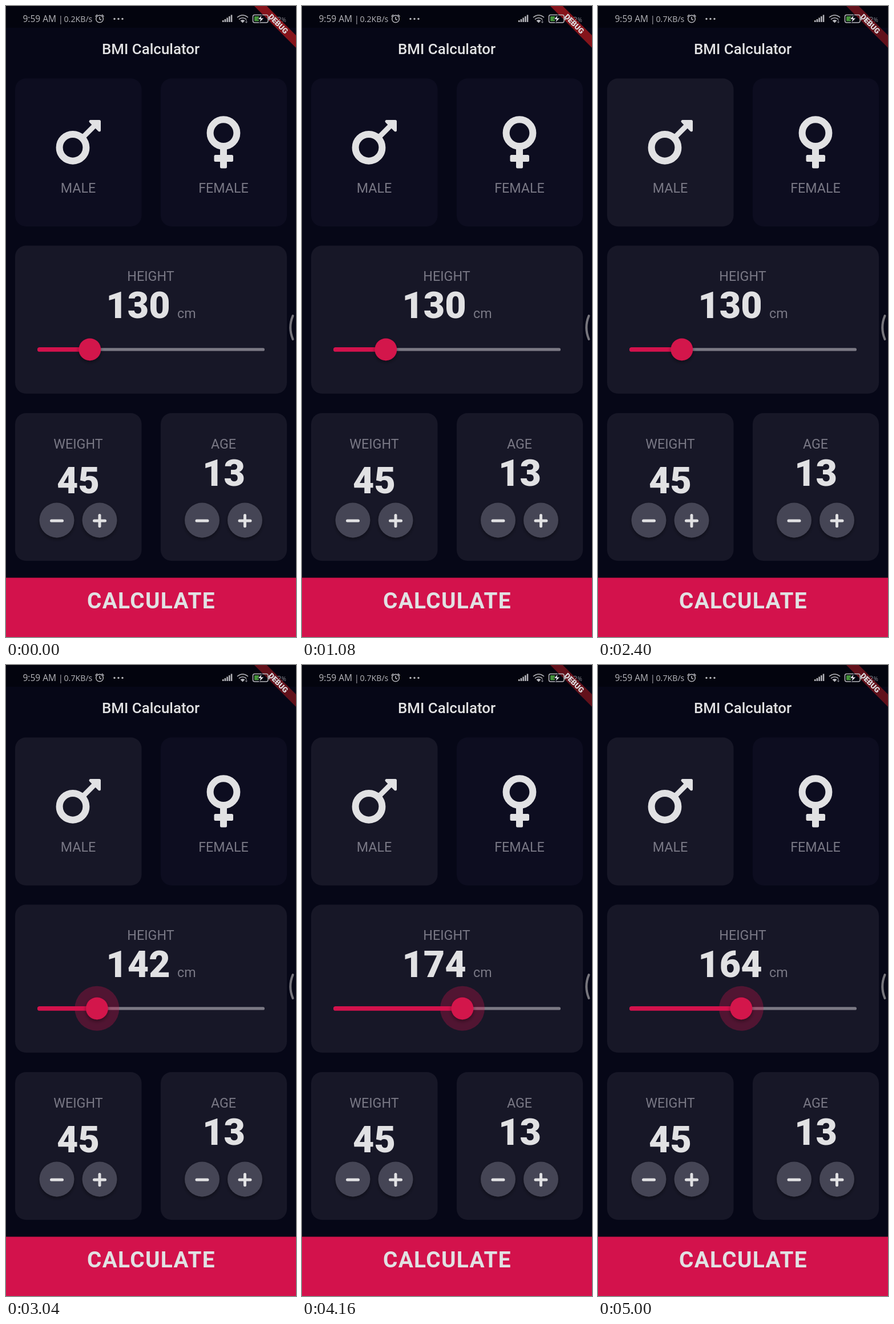
An HTML page for the animation above (5040 ms loop, 508x1102 px).

```html
<!DOCTYPE html>
<html lang="en">
<head>
<meta charset="utf-8">
<title>BMI Calculator</title>
<style>
  html, body { margin: 0; width: 100%; height: 100%; overflow: hidden; background: #060717; }
  svg { display: block; width: 508px; height: 1102px; font-family: Roboto, sans-serif; fill: #e1e1e3; }
  .mid { text-anchor: middle; }
  .label { font-size: 23.3px; fill: #797885; }
  .number { font-size: 64.6px; font-weight: 900; }
  .card { fill: #171727; }
  .idle { fill: #0d0d20; }
  .line { fill: none; stroke: #e1e1e3; }
  .status { font-family: "Open Sans", sans-serif; fill: #b8b8bd; }
  .status .line { stroke: #b8b8bd; stroke-width: 1.5; }
  .pink { fill: #d3124c; }
</style>
</head>
<body>
<svg viewBox="0 0 508 1102">
  <defs>
    <filter id="shadow" x="-30%" y="-30%" width="160%" height="170%">
      <feDropShadow dx="0" dy="3" stdDeviation="3" flood-color="#000" flood-opacity=".4"/>
    </filter>
    <g id="button">
      <circle r="30.4" fill="#454554" filter="url(#shadow)"/>
      <path class="line" d="M-9.5 1H9.5" stroke-width="5" stroke-linecap="round"/>
    </g>
    <g id="plus">
      <use href="#button"/>
      <path class="line" d="M0-8.5V10.5" stroke-width="5" stroke-linecap="round"/>
    </g>
  </defs>

  <rect width="508" height="1102" fill="#060717"/>
  <rect width="508" height="38" fill="#03040e"/>
  <text class="mid" x="253.5" y="83.5" font-size="25.9" font-weight="500">BMI Calculator</text>

  <rect id="maleCard" class="idle" x="16" y="126.5" width="221.5" height="258.5" rx="19"/>
  <rect class="idle" x="271" y="126.5" width="221" height="258.5" rx="19"/>
  <rect class="card" x="16" y="418.5" width="476" height="258.5" rx="19"/>
  <rect class="card" x="16" y="711" width="221.5" height="258" rx="19"/>
  <rect class="card" x="271" y="711" width="221" height="258" rx="19"/>

  <g class="line" stroke-width="12">
    <circle cx="117" cy="247.3" r="23.4"/>
    <path d="M133 231L156 208" stroke-width="9"/>
    <path d="M148 201.500H163.500V217Z" fill="#e1e1e3" stroke-width="5" stroke-linejoin="round"/>
    <circle cx="381" cy="221.700" r="23.4"/>
    <path d="M381 248V262"/>
  </g>
  <rect x="364.500" y="260" width="33.500" height="12" rx="2.500"/>
  <rect x="375" y="254" width="12" height="29.500" rx="2.500"/>
  <text class="label mid" x="126.500" y="326">MALE</text>
  <text class="label mid" x="381" y="326">FEMALE</text>

  <text class="label mid" x="253.500" y="479.500">HEIGHT</text>
  <text class="number mid" id="height" x="231.500" y="544.500">130</text>
  <text class="label" x="300" y="544.800">cm</text>
  <rect x="55" y="597.300" width="398" height="5.200" rx="2.600" fill="#7b7984"/>
  <rect id="filled" class="pink" x="55" y="596" width="92" height="7.800" rx="3.900"/>
  <g id="thumb">
    <circle id="halo" class="pink" r="39" opacity=".31"/>
    <circle class="pink" r="19.400" filter="url(#shadow)"/>
  </g>

  <text class="label mid" x="126.500" y="772.500">WEIGHT</text>
  <text class="number mid" x="126.500" y="851">45</text>
  <text class="label mid" x="381" y="772.500">AGE</text>
  <text class="number mid" x="381.500" y="838">13</text>
  <use href="#button" x="89" y="898"/>
  <use href="#plus" x="164" y="898"/>
  <use href="#button" x="343.500" y="898"/>
  <use href="#plus" x="418.500" y="898"/>

  <rect class="pink" y="998.500" width="508" height="104"/>
  <text class="mid" x="254.500" y="1051.500" font-size="38.800" font-weight="700" letter-spacing="1.300">CALCULATE</text>
  <path d="M502.500 541Q494 561.500 502.500 582" fill="none" stroke="#77767d" stroke-width="4" stroke-linecap="round"/>

  <g transform="translate(508) rotate(45)">
    <rect id="banner" x="-52" y="36.200" width="104" height="15.500" fill="#85141b"/>
    <text class="mid" y="48.600" font-size="13.200" font-weight="900">DEBUG</text>
  </g>

  <g class="status">
    <text x="29.500" y="28" font-size="15.500">9:59 AM</text>
    <text x="92" y="27.500" font-size="14">|</text>
    <text id="speed" x="101.500" y="28" font-size="14.200">0.2KB/s</text>
    <circle class="line" cx="164" cy="22.500" r="6.300"/>
    <path class="line" d="M164 19V23L167 24.500M156.500 18.500L160 15M168 15L171.500 18.500"/>
    <circle cx="190" cy="22.500" r="1.700"/>
    <circle cx="197" cy="22.500" r="1.700"/>
    <circle cx="204" cy="22.500" r="1.700"/>
    <path d="M379 25h2.500v3h-2.500zM382.700 23h2.500v5h-2.500zM386.400 20.500h2.500v7.500h-2.500zM390.100 18h2.500v10h-2.500zM393.800 15.500h2.500v12.500h-2.500z"/>
    <path class="line" d="M405 20Q414.500 12 424 20M408 23.300Q414.500 18 421 23.300" stroke-width="2"/>
    <path d="M410.500 25.500Q414.500 22.500 418.500 25.500L414.500 29.500Z"/>
    <path d="M421 24v5m-1.500-1.500l1.500 2l1.500-2" class="line" style="stroke-width:.8"/>
    <rect class="line" x="432.500" y="15.500" width="26.500" height="13.500" rx="3"/>
    <rect x="460" y="20" width="2" height="5" rx="1"/>
    <rect x="435" y="18" width="8" height="8.500" rx="1" fill="#45923a"/>
    <path d="M448.500 15L441 23.500H445.500L443.500 29.500L452 21H447Z" fill="#e1e1e3" stroke="#060717"/>
    <text x="467" y="28" font-size="13.500" opacity=".75">22<tspan font-size="10">%</tspan></text>
  </g>
</svg>
<script>
  const LOOP = 5040, SELECT = 2200, TOUCH = 2820, THUMB_LAG = 90;
  const drag = [[2880, 130], [2950, 134], [3040, 142], [3430, 169], [3520, 170],
                [4100, 174], [4300, 174], [4900, 164]];
  const el = id => document.getElementById(id);
  const clamp = x => Math.min(1, Math.max(0, x));

  function heightAt(t) {
    let value = drag[0][1];
    for (let i = 1; i < drag.length; i++) {
      const [t0, v0] = drag[i - 1], [t1, v1] = drag[i];
      value += (v1 - v0) * clamp((t - t0) / (t1 - t0));
    }
    return value;
  }

  function draw() {
    const t = performance.now() % LOOP;
    const selected = t >= SELECT;
    const x = 55 + 398 * (heightAt(t - THUMB_LAG) - 100) / 130;
    el('height').textContent = Math.round(heightAt(t));
    el('thumb').setAttribute('transform', `translate(${x} 599.8)`);
    el('filled').setAttribute('width', x - 55);
    el('halo').setAttribute('r', 39 * clamp((t - TOUCH) / 100));
    el('maleCard').setAttribute('class', selected ? 'card' : 'idle');
    el('banner').setAttribute('fill', selected ? '#62111b' : '#85141b');
    el('speed').textContent = selected ? '0.7KB/s' : '0.2KB/s';
    requestAnimationFrame(draw);
  }
  draw();
</script>
</body>
</html>
```
